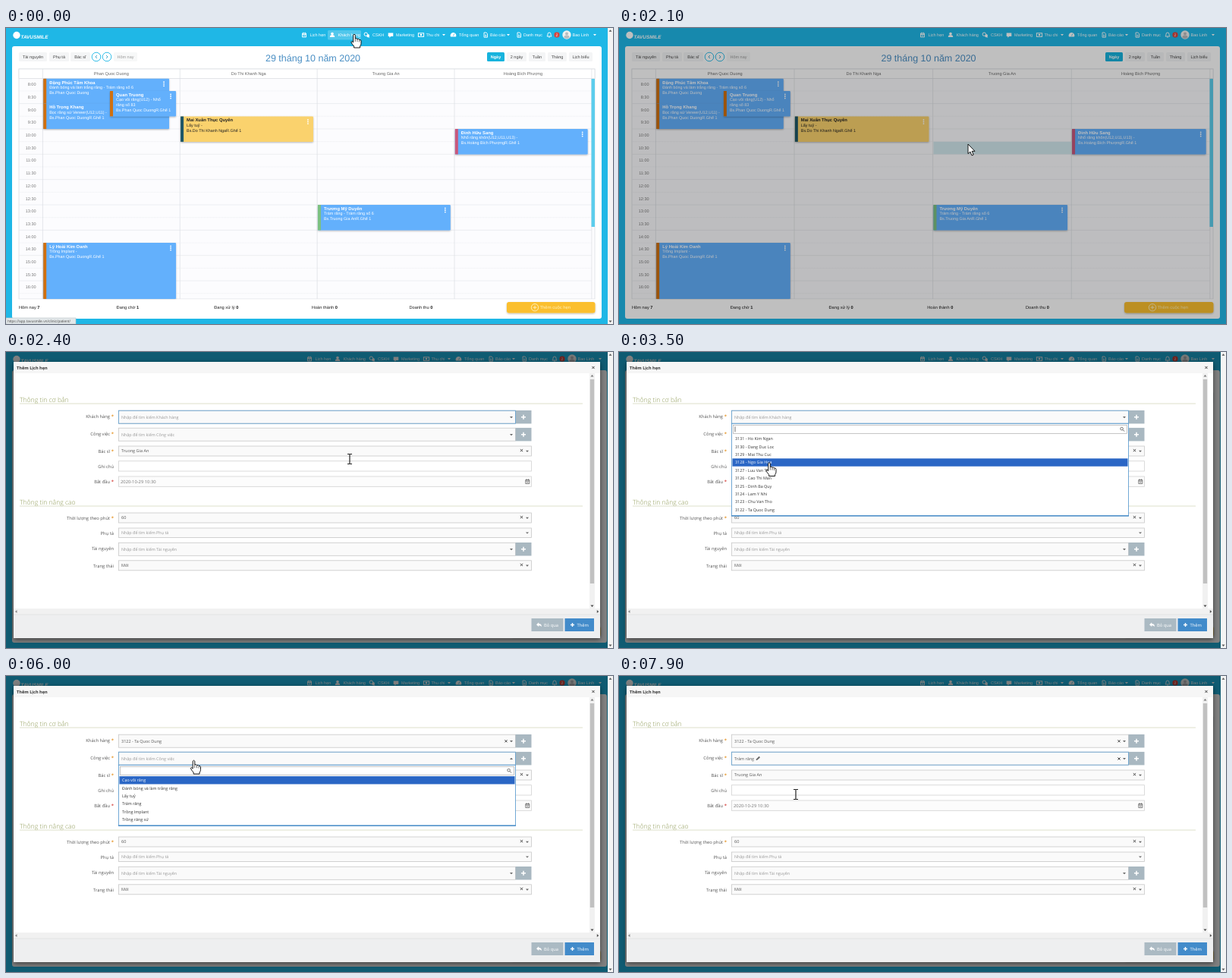
Animation of 800 by 390 pixels, one loop 8 s. Source, as an HTML page:

```html
<!DOCTYPE html>
<html lang="vi">
<head>
<meta charset="utf-8">
<title>Lịch hẹn</title>
<style>
html, body { margin: 0; width: 100%; height: 100%; overflow: hidden; background: #1fb7e6; }
svg { display: block; width: 800px; height: 390px; text-rendering: geometricPrecision; }
.cal { font-family: "Liberation Sans", Arial, sans-serif; }
.dlg { font-family: "Open Sans", sans-serif; }
</style>
</head>
<body>
<svg id="stage" viewBox="0 0 800 390"></svg>
<script>
const TEAL = '#1fb7e6', BLUE = '#64b0fc', ORANGE = '#d0700f', LINE = '#dcdfe3';

// Drawing helpers; text is centred on y
const text = (x, y, s, size = 5.5, fill = '#444', more = '') =>
  `<text x="${x}" y="${y + size * .36}" font-size="${size}" fill="${fill}" ${more}>${s}</text>`;
const rect = (x, y, w, h, fill, more = '') =>
  `<rect x="${x}" y="${y}" width="${w}" height="${h}" fill="${fill}" ${more}/>`;
const path = (d, fill, more = '') => `<path d="${d}" fill="${fill}" ${more}/>`;
const line = (d, stroke, width = .7, more = '') =>
  path(d, 'none', `stroke="${stroke}" stroke-width="${width}" ${more}`);
const dot = (x, y, r, fill, more = '') => `<circle cx="${x}" cy="${y}" r="${r}" fill="${fill}" ${more}/>`;
const group = (id, body, more = '') => `<g id="${id}" ${more}>${body}</g>`;
const caret = (x, y, fill = '#666', up = 1) => path(`M${x - 2} ${y - up}h4l-2 ${2.2 * up}z`, fill);
const BOLD = 'font-weight="700"', MID = 'text-anchor="middle"', END = 'text-anchor="end"';

const ICONS = {
  cal: (x, y) => line(`M${x - 2.5} ${y - 2}h5v5h-5zM${x - 2.5} ${y - .5}h5M${x - 1.2} ${y - 3.3}v2M${x + 1.2} ${y - 3.3}v2M${x - 1.3} ${y + 1.2}h2.6`, '#fff', .9),
  user: (x, y) => dot(x, y - 1.5, 1.8, '#fff') + path(`M${x - 3.2} ${y + 3}q0-3 3.2-3t3.2 3z`, '#fff'),
  chat: (x, y) => dot(x - 1.2, y - .8, 2.2, 'none', 'stroke="#fff"') + path(`M${x + 1.5} ${y - 1}q3 1 1.5 3l.8 1.5q-3 0-4.3-1.5z`, '#fff'),
  mail: (x, y) => path(`M${x - 3.3} ${y - 2.5}h6.6v4.6h-3l-2 1.6v-1.6h-1.6z`, '#fff'),
  cash: (x, y) => rect(x - 3.6, y - 2.2, 7.2, 4.6, 'none', 'stroke="#fff"') + dot(x, y, 1.3, '#fff'),
  gauge: (x, y) => path(`M${x - 3.6} ${y + 2.5}a3.9 3.9 0 1 1 7.2 0z`, '#fff') + line(`M${x} ${y + 1.5}l1.3-3`, TEAL),
  file: (x, y) => line(`M${x - 2} ${y - 3}h3l1.5 1.5v4.7h-4.5zM${x - .8} ${y + .2}h2M${x - .8} ${y + 1.8}h2`, '#fff', .9),
};

const NAV = [
  ['cal', 393, 'Lịch hẹn', 400.5], ['user', 430, 'Khách hàng', 437.5], ['chat', 475.5, 'CSKH', 483],
  ['mail', 507, 'Marketing', 514], ['cash', 547, 'Thu chi', 553.5, 577], ['gauge', 589.5, 'Tổng quan', 597],
  ['file', 632, 'Báo cáo', 638, 662], ['file', 676, 'Danh mục', 682],
];
const DOCTORS = ['Phan Quoc Duong', 'Do Thi Khanh Nga', 'Truong Gia An', 'Hoàng Bích Phượng'];

function header(shift) {
  const nav = NAV.map(([icon, x, label, tx, drop]) =>
    ICONS[icon](x, 9) + text(tx, 9, label, 5.5, '#fff') + (drop ? caret(drop, 9, '#fff') : '')).join('');
  return dot(14, 9.5, 4.7, '#fff') + text(19.5, 11.5, 'TAVUSMILE', 6.4, '#fff', BOLD + ' font-style="italic"') +
    `<g transform="translate(${shift})">` + nav +
    path('M713 11q1-1 1-3 0-2 2-2t2 2q0 2 1 3z', 'none', 'stroke="#fff" stroke-width=".9"') + dot(716, 12, .8, '#fff') +
    rect(722.5, 5.5, 7, 7, '#d8433c', 'rx="3"') + text(726, 9, '2', 5, '#fff', MID) +
    dot(739, 9, 5.7, '#f0f0ee') + dot(739, 7.6, 2, '#b9bcc0') + path('M735.3 12.6q0-3 3.7-3t3.7 3q-3.7 3-7.4 0z', '#b9bcc0') +
    text(746.5, 9, 'Bao Linh', 5.5, '#fff') + caret(776, 9, '#fff') + '</g>';
}

function event(x, y, w, h, bar, lines, fill = BLUE, fg = '#fff', menu = true) {
  const dots = [-3, 0, 3].map(d => dot(x + w - 7, y + 7 + d * .85, .9, '#fff')).join('');
  return rect(x, y, w, h, fill, 'rx="1" filter="url(#soft)"') + rect(x, y, 4, h, bar) +
    lines.map((s, i) => text(x + 8, y + 4.7 + i * 6.7, s, i ? 5.4 : 5.85, fg, i ? '' : BOLD)).join('') + (menu ? dots : '');
}

function button(x, w, label, fill = '#f4f5f6', fg = '#444', more = '') {
  return rect(x, 32, w, 12, fill, 'rx="1.5"') + text(x + w / 2, 38, label, 5.5, fg, MID + ' ' + more);
}

function calendar(w) {
  const shift = w - 785, cw = (w - 61.5) / 4, col = i => 48.4 + cw * i, right = w - 9;
  const ev = (i, ...rest) => event(col(i) + .8, rest[0], cw - 6, ...rest.slice(1));
  let s = rect(0, 0, 800, 390, TEAL) + header(shift) + rect(8, 24, w - 8, 359, '#fff', 'rx="3"');
  s += button(17, 37, 'Tài nguyên') + button(57, 26, 'Phụ tá') + button(85, 26, 'Bác sĩ') + button(142, 31, 'Hôm nay', '#f7f8f8', '#999');
  for (const [x, d] of [[119, -1], [133, 1]])
    s += dot(x, 38, 5.8, '#fff', `stroke="${TEAL}" stroke-width=".9"`) + line(`M${x - d} 36l${2 * d} 2l${-2 * d} 2`, '#2b9fc6', .9);
  s += text(404.5 + shift / 2, 39, '29 tháng 10 năm 2020', 12.5, '#4a8fc4', MID);
  s += `<g transform="translate(${shift})">` + button(634, 23, 'Ngày', '#17b3dd', '#fff', BOLD) + button(660, 26, '2 ngày') +
    button(689, 22, 'Tuần') + button(714, 25, 'Tháng') + button(742, 31, 'Lịch biểu') + '</g>';

  s += rect(17, 54, right - 17, 303, '#fcfcfe', `stroke="${LINE}" stroke-width=".8"`);
  s += rect(17, 54, right - 17, 12.5, '#fff', `stroke="${LINE}" stroke-width=".8"`);
  for (let i = 0; i < 18; i++) {
    const y = 66.2 + i * 16.68, m = 480 + i * 30;
    if (i) s += line(`M17 ${y}H${col(4)}`, '#e6e8ec', .7, i % 2 ? 'stroke-dasharray="1 1"' : '');
    if (i < 17) s += text(39.5, y + 8.2, `${m / 60 | 0}:${m % 60 ? 30 : '00'}`, 5.5, '#777', END);
  }
  for (let i = 0; i < 5; i++) s += line(`M${col(i)} 54V357`, LINE);
  DOCTORS.forEach((n, i) => s += text(col(i) + cw / 2, 60.3, n, 5.6, '#666', MID));
  s += rect(right - 4.5, 67, 4.5, 195, '#5ccdec');
  if (shift) s += rect(col(2) + .8, 149.8, cw - 1, 16.5, '#d3e9ef');

  s += event(col(0) + .8, 66.8, cw - 15, 33.4, ORANGE, ['Đặng Phúc Tâm Khoa', 'Đánh bóng và làm trắng răng - Trám răng số 6', 'Bs.' + DOCTORS[0]]);
  s += event(col(0) + .8, 99.6, cw - 15, 33.4, ORANGE, ['Hồ Trọng Khang', 'Bọc răng sứ Veneer(U12,U11) -', `Bs.${DOCTORS[0]}R.Ghế 1`], BLUE, '#fff', false);
  s += event(col(0) + cw * .49, 83, cw * .51 - 5.2, 33.4, ORANGE, ['Quan Truong', 'Cạo vôi răng(U12) - Nhổ', 'răng số 83', `Bs.${DOCTORS[0]}R.Ghế 1`]);
  s += ev(1, 116.5, 33.4, '#1d5668', ['Mai Xuân Thục Quyên', 'Lấy tuỷ -', `Bs.${DOCTORS[1]}R.Ghế 1`], '#fad26d', '#222');
  s += ev(3, 133, 33.4, '#c9587c', ['Đinh Hữu Sang', 'Nhổ răng khôn(U12,U11,U13) -', `Bs.${DOCTORS[3]}R.Ghế 1`]);
  s += ev(2, 233, 33.4, '#7cc182', ['Trương Mỹ Duyên', 'Trám răng - Trám răng số 6', `Bs.${DOCTORS[2]}R.Ghế 1`]);
  s += ev(0, 283, 74, ORANGE, ['Lý Hoài Kim Oanh', 'Trồng Implant -', `Bs.${DOCTORS[0]}R.Ghế 1`]);

  s += rect(9, 357.4, w - 10, 24, '#fff');
  ['Hôm nay 7', 'Đang chờ 1', 'Đang xử lý 0', 'Hoàn thành 0', 'Doanh thu 0'].forEach((label, i) =>
    s += text(17 + i * 128.6 * w / 785, 367.5, label.replace(/\d/, `<tspan ${BOLD}>$&</tspan>`), 5.7, '#222'));
  const bx = 660 + shift * .86, bw = 116.5 + shift * .14;
  s += rect(bx, 361, bw, 14.5, '#fbbf2d', 'rx="3" filter="url(#soft)"') +
    dot(bx + 37, 368.2, 4.7, 'none', 'stroke="#fff3c8" stroke-width=".9"') +
    line(`M${bx + 34.5} 368.2h5M${bx + 37} 365.7v5`, '#fff3c8', .9) + text(bx + 43.5, 368.2, 'Thêm cuộc hẹn', 5.9, '#fff0b8');
  return s;
}

const scrollbar = rect(793, 0, 7, 390, '#f4f4f4') + path('M794.5 4.8h4l-2-2.5z', '#555') + path('M794.5 385.5h4l-2 2.5z', '#555');

const GREY = '#555', cross = (x, y) => line(`M${x - 1.6} ${y - 1.6}l3.2 3.2m0-3.2l-3.2 3.2`, '#444', 1);
const hint = (y, s) => text(152, y, 'Nhập để tìm kiếm ' + s, 5.4, '#999');
const frame = (y, h, w, fill = '#fafafa', stroke = '#c8c8c8') => rect(148.4, y, w, h, fill, `stroke="${stroke}" stroke-width=".8"`);
const focusBox = (id, y) => group(id, frame(y, 17, 523, 'none', '#5f9fd0'));

function label(y, s, star) {
  return text(star ? 137 : 142, y, s, 5.8, '#555', END) + (star ? text(138.8, y + .3, '*', 6, star, BOLD) : '');
}
function picker(y) {
  return frame(y, 17, 523) + rect(671.5, y - .3, 21, 17.5, '#a9b8c1') + line(`M679 ${y + 8.5}h6M682 ${y + 5.5}v6`, '#fff', 1.5);
}
function filled(y, value) {
  return frame(y, 13, 544) + text(152, y + 6.3, value, 5.5, GREY) + cross(679.5, y + 5.6) + caret(687, y + 6.8);
}
function section(y, s) {
  return text(18, y, s, 8.6, '#8f9b57', 'font-weight="300"') + line(`M18 ${y + 5.5}H760`, '#d5d9bd', .8);
}

const STEP = 10.4;
function dropdown(id, top, items) {
  const h = items.length * STEP + 17.5;
  return group(id, rect(148.4, top, 523, h, '#fff', 'stroke="#4f94cc" stroke-width=".8"') + line(`M148 ${top + h}h524`, '#3f86c4', 1.2) +
    rect(150.5, top + 2, 519, 11, '#fff', 'stroke="#aaa" stroke-width=".7"') +
    dot(662.6, top + 6.8, 1.8, 'none', 'stroke="#555" stroke-width=".8"') + line(`M664 ${top + 8.2}l2 2`, '#555', 1) +
    line(`M153 ${top + 4}v7`, '#333', .7, 'class="ins"') +
    rect(149.5, top + 14.8, 521, STEP, '#2a66c5', 'class="hl"') +
    items.map((s, i) => text(153, top + 20 + i * STEP, s, 5.4, '#333', 'class="item"')).join(''));
}

const PATIENT = '3122 - Ta Quoc Dung', WORK = 'Trám răng';
const patients = ['Ho Kim Ngan', 'Dang Duc Loc', 'Mai Thu Cuc', 'Ngo Gia Hoa', 'Luu Van Tin', 'Cao Thi Man', 'Dinh Ba Quy', 'Lam Y Nhi', 'Chu Van Tho']
  .map((n, i) => `${3131 - i} - ${n}`).concat(PATIENT);
const works = ['Cạo vôi răng', 'Đánh bóng và làm trắng răng', 'Lấy tuỷ', WORK, 'Trồng Implant', 'Trồng răng sứ'];

function dialog() {
  const gold = '#e79a33', red = '#d9534f';
  const chosen = (y, s) => text(152, y, s, 5.5, GREY) + cross(659, y);
  return rect(10, 13, 773, 364, '#fff', 'rx="1.5" filter="url(#deep)"') + rect(10, 13, 773, 15, '#f6f6f6') +
    text(14, 20.5, 'Thêm Lịch hẹn', 5.6, '#333', BOLD) + cross(774, 20.5) +
    rect(769, 28, 7, 310, '#f1f1f1') + rect(769.8, 36, 5.4, 269, '#c1c1c1') +
    path('M770.5 32.5h4l-2-2.5z', '#777') + path('M770.5 333.5h4l-2 2.5z', '#444') +
    rect(10, 338, 773, 8, '#f1f1f1') + path('M14.5 340v4l-2.5-2z', '#888') + path('M778.8 340v4l2.5-2z', '#555') +
    rect(10, 346, 773, 31, '#eeeff0') + line('M10 346H783', '#dddddd') +
    rect(692.5, 351, 42, 17, '#abbac3') + path('M699 359.3l3.2-3v1.8q4 0 3.6 4-1-2-3.6-1.9v1.9z', '#fff') + text(709, 359.5, 'Bỏ qua', 5.8, '#fff') +
    rect(736.5, 351, 38.5, 17, '#428bca') + line('M744 359.5h5M746.5 357v5', '#fff', 1.4) + text(752.5, 359.5, 'Thêm', 5.8, '#fff') +
    section(62.5, 'Thông tin cơ bản') + section(197.5, 'Thông tin nâng cao') +
    label(85, 'Khách hàng', gold) + label(108, 'Công việc', gold) + label(131, 'Bác sĩ', gold) + label(151, 'Ghi chú') +
    label(171, 'Bắt đầu', red) + label(219, 'Thời lượng theo phút', gold) + label(239, 'Phụ tá') + label(259, 'Tài nguyên') + label(282, 'Trạng thái') +
    picker(77.2) + focusBox('pFocus', 77.2) + caret(666, 86) + group('pHint', hint(85.8, 'Khách hàng')) + group('pValue', chosen(85.8, PATIENT)) +
    picker(100.2) + focusBox('wFocus', 100.2) + group('wDown', caret(666, 109)) + group('wUp', caret(666, 109, '#666', -1)) +
    group('wHint', hint(109, 'Công việc')) +
    group('wValue', chosen(109, WORK) + path('M180.6 111.2l.5-2 3.6-3.4 1.3 1.4-3.5 3.4z', '#666')) +
    filled(124, DOCTORS[2]) + frame(143.7, 13.3, 544, '#fff', '#d2d2d2') +
    frame(164, 13.3, 544, '#fcfcfc', '#d2d2d2') + text(151, 170.8, '2020-10-29 10:30', 5.8, '#777') +
    line('M684.8 168.5h5v5h-5zM684.8 170h5M686 167.2v2M688.6 167.2v2M686 171.7h2.6', '#666', .8) +
    filled(212, '60') + frame(232, 12.5, 544) + hint(238.2, 'Phụ tá') + caret(687, 238.4) +
    picker(251.3) + hint(260, 'Tài nguyên') + caret(666, 260) + filled(274.8, 'Mới') +
    dropdown('pList', 94.3, patients) + dropdown('wList', 117.3, works);
}

const INK = 'stroke="#000" stroke-width=".9" stroke-linejoin="round"';
const cursors =
  group('arrow', path('M0 0V12.6L2.9 10 5 14.9 7.2 14 5.2 9.3H9Z', '#fff', INK)) +
  group('hand', path('M-1.3 11V1.2Q0-.8 1.3 1.2V6Q3.3 5 4 6.7 6 5.8 6.6 7.5 8.8 7 9 9V12.5Q9 14.5 7.6 16V18H-.4V16Q-3 13.4-4.2 10.5-3.2 8.6-1.3 11Z', '#fff', INK) +
    line('M1.3 6V10M4 7V10.2M6.6 7.8V10.5', '#000', .6)) +
  group('beam', line('M-3-6.5h2.2L0-6l.8-.5H3M0-6V6M-3 6.5h2.2L0 6l.8.5H3', '#222', 1.2));

const stage = document.getElementById('stage');
stage.innerHTML = `<defs>
  <filter id="soft" x="-10%" y="-20%" width="120%" height="150%"><feDropShadow dx="0" dy="1" stdDeviation="1" flood-opacity=".28"/></filter>
  <filter id="deep"><feDropShadow dx="0" dy="2" stdDeviation="3" flood-opacity=".5"/></filter></defs>` +
  group('normal', calendar(785) + group('hover',
    rect(424, 3, 44, 12.5, '#fff', 'rx="1.5" opacity=".22"') + rect(0, 382, 92, 8, '#e3e8ea', 'stroke="#b9c2c6" stroke-width=".6"') +
    text(2, 386, 'https://app.tavusmile.vn/clinic/patient/', 5, '#555')), 'class="cal"') +
  group('wide', calendar(792), 'class="cal"') + group('shade', rect(0, 0, 800, 390, '#000')) +
  group('bar', scrollbar) + group('dialog', dialog(), 'class="dlg"') + group('cursor', cursors);

const el = {};
stage.querySelectorAll('g[id]').forEach(g => el[g.id] = g);
const show = (id, on) => el[id].style.display = on ? '' : 'none';

const MOVES = [
  [0, 459, 8], [500, 459, 8], [1300, 460, 148], [1400, 460, 152], [1700, 460, 153], [2200, 460, 153], [2400, 453, 141],
  [2700, 452, 260], [2900, 290, 190], [3100, 164, 88], [3400, 164, 88], [3600, 232, 203], [4700, 232, 203],
  [5300, 247.5, 111], [6000, 247.5, 111], [6700, 229, 168], [7500, 229, 168], [7900, 233, 156], [8000, 233, 156],
];
function pointer(t) {
  const i = MOVES.findIndex(m => m[0] > t), [t0, x0, y0] = MOVES[i - 1], [t1, x1, y1] = MOVES[i];
  const u = (t - t0) / (t1 - t0), e = u * u * (3 - 2 * u);
  return [x0 + (x1 - x0) * e, y0 + (y1 - y0) * e];
}

function pick(id, first, y) {
  const items = el[id].querySelectorAll('.item'), hl = el[id].querySelector('.hl');
  const n = Math.max(0, Math.min(items.length - 1, Math.round((y - first) / STEP)));
  hl.setAttribute('y', first - 5.2 + n * STEP);
  items.forEach((item, i) => item.setAttribute('fill', i === n ? '#fff' : '#333'));
}

function draw(t) {
  const within = (a, b) => t >= a && t < b;
  const [x, y] = pointer(t);
  const opened = t >= 2100, modal = t >= 2300;
  show('normal', !opened);
  show('wide', opened);
  show('hover', t < 700);
  show('shade', opened);
  el.shade.setAttribute('opacity', t < 2200 ? .25 : t < 2300 ? .46 : .5);
  show('bar', !opened || modal);
  show('dialog', modal);
  el.dialog.setAttribute('transform', `translate(0 ${t < 2400 ? -14 : 0})`);
  el.dialog.setAttribute('opacity', t < 2400 ? .7 : 1);

  const pList = within(3300, 4000), wList = within(5400, 7100);
  show('pHint', t < 4100);
  show('pValue', t >= 4100);
  show('pFocus', t < 5600);
  show('pList', pList);
  show('wHint', t < 7200);
  show('wValue', t >= 7200);
  show('wFocus', t >= 5400);
  show('wUp', wList);
  show('wDown', !wList);
  show('wList', wList);
  pick('pList', 114.3, y);
  pick('wList', 137.3, y);
  el.wList.querySelector('.ins').style.display = within(6400, 6900) ? '' : 'none';

  const hand = t < 700 || within(3000, 4100) || within(5200, 7200);
  const beam = within(2400, 2600) || t >= 7700;
  show('hand', hand);
  show('beam', beam);
  show('arrow', !hand && !beam);
  el.cursor.setAttribute('transform', `translate(${x} ${y})`);
}

function tick() {
  draw(Math.floor(performance.now() % 8000 / 100) * 100);
  requestAnimationFrame(tick);
}
tick();
</script>
</body>
</html>
```
